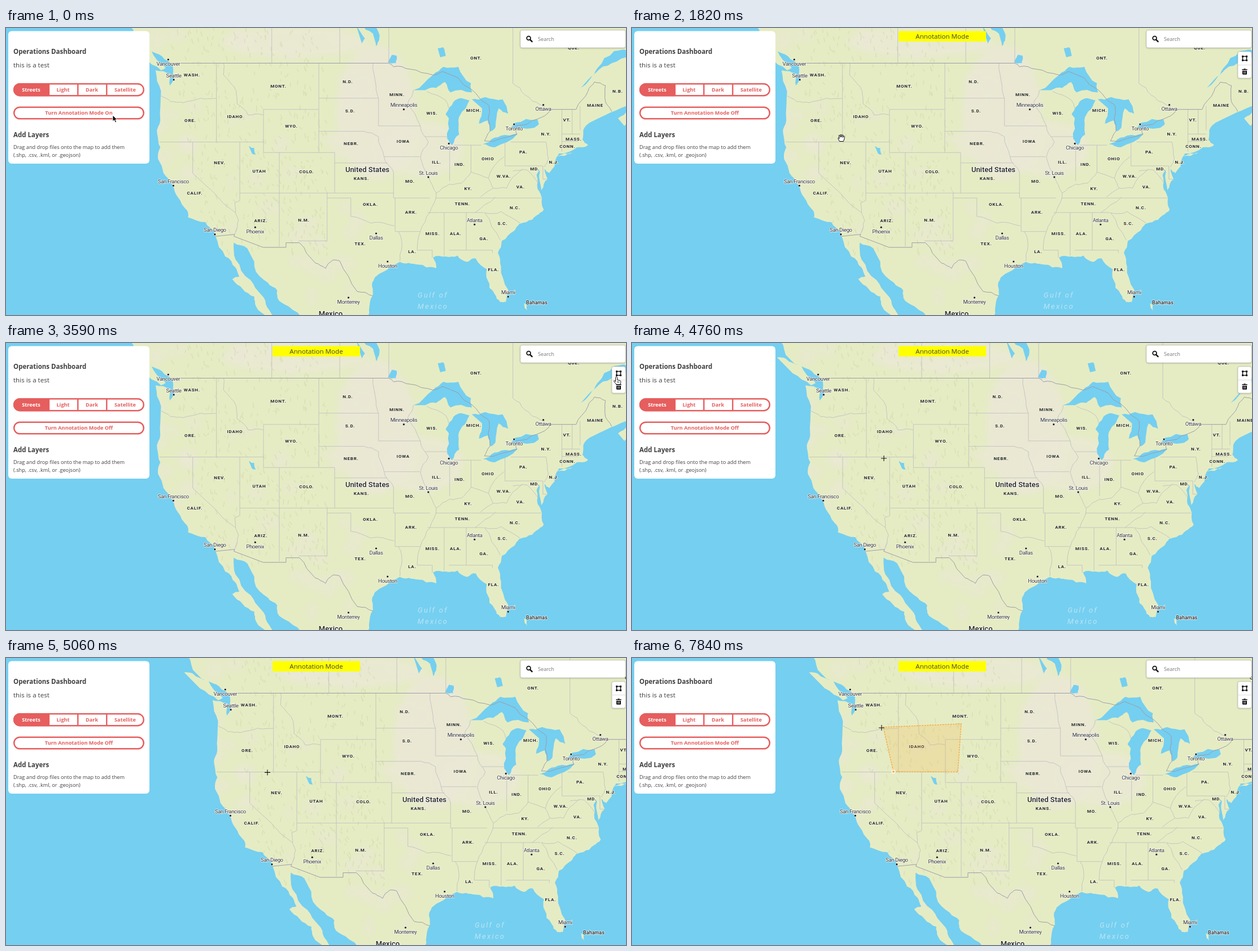
An HTML page that plays this animation: 1098 by 510 pixels, repeating every 7990 ms.

```html
<!DOCTYPE html>
<html lang="en">
<head>
<meta charset="utf-8">
<title>Map annotation</title>
<style>
html, body { margin: 0; width: 100%; height: 100%; overflow: hidden; background: #75cff0; }
svg { display: block; width: 100vw; height: 100vh; }
text { font-family: "Open Sans", sans-serif; fill: #404040; }
#map text { font-family: Roboto, sans-serif; text-anchor: middle; paint-order: stroke; stroke: #fffd; stroke-width: 1.6px; stroke-linejoin: round; fill: #222; }
#map .state { font-size: 8px; font-weight: 700; letter-spacing: .8px; stroke: #f0f2de; }
#map .city { font-size: 9.5px; letter-spacing: -.35px; fill: #333; }
#map .country { font-size: 13px; font-weight: 500; }
#map .islands { font-size: 9px; font-weight: 500; }
#map .sea { font-size: 13px; font-style: italic; letter-spacing: 2.3px; fill: #b9e5f6; stroke: none; }
.title { font-size: 11.5px; font-weight: 700; }
.lead { font-size: 11.6px; }
.note { font-size: 9.2px; }
.btn { font-size: 9.2px; font-weight: 700; text-anchor: middle; fill: #e65e5e; }
</style>
</head>
<body>
<svg viewBox="0 0 1098 510" preserveAspectRatio="none">
  <defs>
    <clipPath id="clip"><path id="clipLand"/></clipPath>
    <filter id="soft" x="-40%" y="-40%" width="180%" height="180%"><feGaussianBlur stdDeviation="6"/></filter>
    <filter id="shade" x="-10%" y="-20%" width="120%" height="150%"><feDropShadow dx="0" dy="0.5" stdDeviation="1" flood-opacity=".35"/></filter>
  </defs>
  <rect width="1098" height="510" fill="#75cff0"/>
  <g id="map">
    <path id="land" fill="#e5ecc3"/>
    <g clip-path="url(#clip)">
      <g id="dry" fill="#ebe8d8" filter="url(#soft)"></g>
      <path id="relief" fill="none" stroke="#cdd5a5" stroke-opacity=".45" stroke-width="1.7" stroke-linecap="round"/>
    </g>
    <path id="lakes" fill="#75cff0"/>
    <path id="isles" fill="#e5ecc3"/>
    <path id="states" fill="none" stroke="#bcbcc2" stroke-width=".8"/>
    <path id="nations" fill="none" stroke="#9c9ca8"/>
    <g id="labels"></g>
  </g>

  <g id="shape">
    <path id="area" fill="#fbb03b" fill-opacity=".2"/>
    <path id="edge" fill="none" stroke="#fba73b" stroke-width="1.4" stroke-dasharray="3 1.6"/>
    <circle cx="463" cy="202" r="3.4" fill="#fff"/>
    <circle cx="463" cy="202" r="2.1" fill="#fbb03b"/>
  </g>

  <rect x="4" y="5.5" width="250" height="235.5" rx="6" fill="#fff"/>
  <text class="title" x="13" y="46">Operations Dashboard</text>
  <text class="lead" x="13" y="70">this is a test</text>
  <path d="M76 98.2H24.5a11.5 11.5 0 0 0 0 23H76z" fill="#e65e5e"/>
  <g fill="none" stroke="#e65e5e" stroke-width="2.4">
    <rect x="14.2" y="99.2" width="229.6" height="21" rx="10.5"/>
    <path d="M76 99v21M127.3 99v21M178.3 99v21"/>
    <rect x="14.2" y="140.7" width="229.6" height="20.6" rx="10.3"/>
  </g>
  <text class="btn" x="44.5" y="112.6" style="fill:#fff">Streets</text>
  <text class="btn" x="101" y="112.6">Light</text>
  <text class="btn" x="152" y="112.6">Dark</text>
  <text class="btn" x="211" y="112.6">Satellite</text>
  <text class="btn" id="mode" x="129" y="154.2"></text>
  <text class="title" x="13" y="194">Add Layers</text>
  <text class="note" x="13" y="215">Drag and drop files onto the map to add them</text>
  <text class="note" x="13" y="229">(.shp, .csv, .kml, or .geojson)</text>

  <rect x="911" y="4" width="186" height="31" rx="3" fill="#fff" stroke="#bbb" stroke-width=".6" filter="url(#shade)"/>
  <circle cx="925.6" cy="18" r="3.4" fill="none" stroke="#111" stroke-width="1.8"/>
  <path d="M928 20.6l3.6 3.6" stroke="#111" stroke-width="2.4" stroke-linecap="round"/>
  <text class="note" x="942" y="23" style="fill:#777">Search</text>

  <g id="tools">
    <rect x="472" y="5.5" width="155" height="18.5" fill="#ff0"/>
    <text class="lead" x="549.5" y="19.2" text-anchor="middle">Annotation Mode</text>
    <rect x="1073" y="42" width="24" height="47" rx="3" fill="#fff" stroke="#bbb" stroke-width=".6" filter="url(#shade)"/>
    <path d="M1073 65.8h24" stroke="#ddd"/>
    <path d="M1081.5 50.5h7v7h-7z" fill="none" stroke="#111" stroke-width="1.5"/>
    <path d="M1080 49h3v3h-3zm7 0h3v3h-3zm-7 7h3v3h-3zm7 0h3v3h-3z" fill="#111"/>
    <path d="M1080.3 74h9.4M1083.5 73h3" stroke="#111" stroke-width="1.6"/>
    <path d="M1081 76h8v5.5q0 1.3-1.3 1.3h-5.4q-1.3 0-1.3-1.3z" fill="#111"/>
    <path d="M1083.8 77.2v4M1086.2 77.2v4" stroke="#fff" stroke-width=".9"/>
  </g>

  <g id="cursor" stroke-linejoin="round">
    <path id="arrow" d="M0 0V11l2.6-2.4 2 4.4 2-.9-2-4.2H8z" fill="#000" stroke="#fff" stroke-width=".9"/>
    <path id="point" d="M-1.5 1.5a1.5 1.5 0 0 1 3 0V5.6l5 1.2q1.6.5 1.3 2.5L7 13.6H0L-4.3 8.5q-.6-1.9 1-1.5l1.8 1.6zM2 8v2.5M4.3 8.3v2.3" fill="#fff" stroke="#111"/>
    <path id="grab" d="M-3.5 6.5L-6 1.5q-.3-2 1.2-1l1.2 1-1.2-5q.2-1.6 1.6-1L-2-1V-5q1-1.5 2 0v4l1-3.8q1.2-1 1.8.2L2.3-.5 3.7-3q1.3-.7 1.6.6L5 2 3.5 6.5z" fill="#fff" stroke="#111"/>
    <path id="cross" d="M-5 0H5M0-5V5" stroke="#111" stroke-width="1.1"/>
  </g>
</svg>
<script>
const $ = id => document.getElementById(id);
const set = (id, d) => $(id).setAttribute('d', d);
let seed = 7;
const rnd = () => (seed = seed * 16807 % 2147483647) / 2147483647;
const span = (a, b) => a + rnd() * (b - a);

// Mercator: degrees west and north to pixels, 14 px per degree.
const project = ([w, n]) => [2010.7 - 14 * w, 851.6 - 802.1 * Math.log(Math.tan((45 + n / 2) * Math.PI / 180))];
const numbers = s => s.trim().split(/\s+/).map(p => p.split(',').map(Number));
const geo = s => numbers(s).map(project);
const line = pts => 'M' + pts.map(p => p.map(v => +v.toFixed(1)).join(' ')).join('L');
const each = (list, fn) => list.split('|').map(s => fn(s.trim())).join('');

// Midpoint displacement turns a few key points into a ragged shore.
function ragged(pts, rough, levels = 2) {
  for (; levels--;) {
    pts = pts.flatMap((p, i) => {
      const q = pts[i + 1];
      if (!q) return [p];
      const dx = q[0] - p[0], dy = q[1] - p[1], k = Math.hypot(dx, dy) < 60 ? span(-rough, rough) : 0;
      return [p, [(p[0] + q[0]) / 2 - dy * k, (p[1] + q[1]) / 2 + dx * k]];
    });
  }
  return pts;
}
const shore = s => line(ragged(geo(s), .12)) + 'Z';
const river = s => line(ragged(geo(s), .1));
// Straight borders: a start, then the next longitude and latitude in turn.
function walk(s) {
  const [w, n, ...turns] = s.split(' ').map(Number), at = [w, n], pts = [[w, n]];
  turns.forEach((v, i) => { at[i % 2] = v; pts.push([...at]); });
  return line(pts.map(project));
}

const pacific = `128.4,52.3 127.2,50.9 124.6,49.8 123.2,49.2 122.5,48.7 122.3,47.6 122.9,47.1 122.8,48.1 124.7,48.4 124,46.6
  124.1,44 124.5,42.8 124.1,41.5 124.4,40.4 123.7,39 122.5,37.8 121.9,36.6 120.7,35.2 120.6,34.5 118.4,34 117.2,32.8`;
const baja = `117.1,32.5 115.9,30.3 114.6,29.1 114.1,28.1 115,27.8 113.7,26.7 112.2,25.8 112,24.7 110.3,23.5 109.9,22.9
  109.4,23.2 110.6,24.6 111.3,26 112.7,27.7 114.6,30 114.8,31.8 113.1,31.2 112.2,29.2 110.5,27.4 109.3,26.5 109.3,25.7 107.9,24.7 106,22.9`;
const gulf = `97.7,22.9 97.7,24.3 97.2,26 97.3,27.4 96.4,28.4 94.7,29.4 93.8,29.7 92.3,29.5 91.3,29.4 90.4,29.1 89.2,29
  89.6,30.2 88,30.3 86.5,30.4 85.3,29.7 84.2,30.1 82.8,28.9 82.7,27.7 81.8,26.1 81.1,25.2 80.4,25.2`;
const atlantic = `80.1,26.6 81,29.2 81.4,30.7 80.9,32 79.3,33.1 78.7,33.8 77.8,34 76.5,34.7 75.6,35.3 76,36.9 76.4,37.5 76.5,38.8
  76.1,39.3 76.1,38.2 75.9,37.3 75.1,38.4 75.5,39.4 74.9,39 74,40.5 73.7,40.9 71.4,41.5 70,41.7 70.7,42.2 70.6,43.1 69.8,43.8 67.2,44.7 64.5,45.6`;
const coast = line([...ragged(geo(pacific + ' ' + baja), .12), ...ragged(geo(gulf + ' ' + atlantic), .12), [1110, -5], [212, -5]]) + 'Z';
set('land', coast);
set('clipLand', coast);

set('lakes', each(`92.1,46.7 89.6,48 88.3,48.7 86.4,48.7 84.8,47.3 84.7,46.5 87.4,46.5 88.1,47.4 89.2,46.9 90.6,46.7
  |85,45.8 85.6,45 86.4,44 86.3,42.7 87.2,41.7 87.8,42.3 87.6,44.2 88,44.6 87,45.7 86,46
  |84.7,45.9 83,46.1 80.8,45.9 80.1,44.6 81.3,45.1 81.7,43.4 82.4,43 82.7,44 83.8,43.7 83.4,45.1
  |83.3,41.8 81.8,41.5 78.9,42.8 81,42.6 82.5,42|79.8,43.3 77,43.3 76.2,43.7 76.4,44.1 79.2,43.8
  |112.9,41.6 112.2,41.4 112,40.8 112.5,40.9|98.5,53 97,52 96.4,51 96.8,50.4 97.2,51.4 98.8,52.2|99.3,52 98.2,51 98.6,50.6
  |95.3,49.1 94.3,49 94.2,49.6 94.8,49.7|89,50.2 88.3,50.3 88,49.6 88.7,49.5
  |70.9,46.9 69,48.2 67,49 64.5,49.4 64.5,50 66.7,50 68.8,48.6 70,47.6`, shore));
set('isles', each(`128.3,50.7 127.2,50.6 125.3,50.1 123.4,48.6 124,48.4 126.3,49.4|66.2,44.2 65,45 63,45.3 63,44.6 65.4,43.5
  |74,40.6 72,41 73,40.9|78.1,25.1 77.8,24.9 77.7,24.2 78,24.5`, shore));

set('states', each('124.2 42 111.05 45 104.05 49|120 42 120 39|117 49 117 42|114.05 42 114.05 36.2|111.05 42 111.05 41 102.05 40 95.4'
  + '|104.05 45 104.05 41|104.05 46 96.5 43.5 91.2|104.05 43 98.3|109.05 41 109.05 31.4|114.05 37 94.6|102.05 40 102.05 37'
  + '|103 37 103 32 106.6|103 36.5 100 34.6|95.8 40.6 91.3|94.6 39.1 94.6 36.5 90|94.4 36.5 94.4 33 91.2|90.6 42.5 87.8|87.5 41.7 87.5 38.2'
  + '|87 41.7 83.5|84.8 41.7 84.8 39.1|80.5 42 80.5 39.7 75.7 38.4 75.1|79.8 42 75.3|90.3 35 83.2|89.3 36.5 75.9|88.2 35 88.2 30.4'
  + '|85.4 35 85.4 31|87.6 31 82.1 30.7|91.6 31 89.7 30.2|73.3 45 73.3 41.1|73.3 42.05 71.2|73.3 42.75 71|72 45 72 42.7|71 45.3 71 43.1'
  + '|110 53 110 49|101.4 53 101.4 49|95.2 49 95.2 53|79.5 53 79.5 47.3', walk)
+ each(`120,39 114.6,35|114.1,36.2 114.7,36 114.6,35 114.2,34.2 114.7,32.7|124,46.2 122.8,45.7 121.2,45.6 119,46 117,46
  |116.1,49 116.1,48 114.5,46.6 114.4,45.5 113,44.5 111.1,44.5|100,34.6 97.5,33.9 94.5,33.6|97.2,49 96.8,47 96.5,46
  |98.3,43 96.5,42.5 95.8,40.6 94.6,39.1|92.1,46.7 92.8,45.6 91.2,43.5 90.2,42 91.2,40.5 90.2,38.7 89.2,37 90,35 91.2,33 91.6,31
  |89.2,37 87.5,37.9 86,38 84.8,39.1 82.6,38.5 80.6,40.6|82.6,38.5 82,37.5 80.3,37.5 78.3,39.4|79.5,39.2 77.7,39.3 76.3,38
  |82,37.5 83.6,36.6|84.3,35 81.7,36.6|83.1,35 81,35.1 78.6,33.9|83.1,35 81.1,32.1|94,33 93.6,31 93.8,29.8|90.4,46.6 88,45.8 87.6,45.1
  |79.5,47.3 78,46.3 76,45.4 74.7,45|75.3,42 75,40.4 75.5,39.6`, river));
set('nations', each('123,49 95.2,49|74.7,45 71.5,45|117.1,32.5 114.7,32.7 114.8,32.5 111.1,31.3 108.2,31.3 108.2,31.8 106.5,31.8', s => line(geo(s)))
+ each(`95.2,49 94.6,48.7 92.5,48.5 89.6,48 88.4,48.3 84.8,46.8 83.6,45.9 82.5,45.3 82.4,43 83.1,42.1 79,42.7 79.1,43.5 76.5,44.1 74.7,45
  |71.5,45 70,46.6 69.2,47.4 67.8,47.1 67.8,45.7 67,44.8|106.5,31.8 104.5,29.6 103.2,29 102.3,29.9 101.4,29.8 99.2,26.4 97.2,25.9`, river));

// Scattered dry patches around a wide pale plain, and short strokes for hills.
const patch = (x, y, a, b, o) => `<ellipse cx="${x}" cy="${y}" rx="${a}" ry="${b}" opacity="${o}"/>`;
$('dry').innerHTML = patch(655, 150, 70, 120, .8) + patch(735, 215, 75, 50, .7) + patch(510, 25, 130, 28, .7)
  + Array.from({ length: 55 }, () => patch(span(265, 640), span(0, 510), span(6, 22), span(6, 18), .5)).join('');
set('relief', Array.from({ length: 420 }, () => {
  const y = span(0, 400), x = span(285 + y / 6, 570);
  return `M${x.toFixed(1)} ${y.toFixed(1)}l${span(-2, 4).toFixed(1)} ${span(2, 8).toFixed(1)}`;
}).join(''));

const label = (cls, name, x, y) => `<text class="${cls}" x="${x}" y="${y}">${name}</text>`;
const states = `WASH.,329,83|MONT.,482,103|N.D.,605,95|MINN.,692,118|ONT.,832,53|QUE.,1005,35|N.B.,1083,112|MAINE,1043,137|ORE.,326,164
|IDAHO,405,157|WYO.,505,174|S.D.,609,147|WIS.,754,151|MICH.,828,146|VT.,993,163|N.Y.,956,188|MASS.,1005,197|CONN.,994,210|NEBR.,611,205
|IOWA,703,201|ILL.,762,238|IND.,803,242|OHIO,853,232|PA.,916,220|N.J.,970,238|MD.,936,250|W.VA.,881,263|VA.,911,282|NEV.,378,239
|UTAH,448,254|COLO.,532,255|KANS.,629,267|MO.,715,272|KY.,818,285|TENN.,808,312|N.C.,901,319|S.C.,879,347|CALIF.,334,293|ARIZ.,451,342
|N.M.,527,341|OKLA.,645,313|ARK.,717,327|TEX.,627,383|LA.,719,397|MISS.,755,365|ALA.,796,365|GA.,846,374|FLA.,863,429`;
const named = dy => s => {
  const [name, w, n] = s.split(','), [x, y] = project([w, +n]);
  return `<circle cx="${x}" cy="${y}" r="1.9" fill="#111" stroke="#fff" stroke-width=".6"/>` + label('city', name, x, y + dy);
};
const labelBelow = 'Vancouver,123.1,49.3|Phoenix,112.1,33.45|Chicago,87.6,41.85|Dallas,96.8,32.8|Houston,95.35,29.75|Toronto,79.35,43.65|Ottawa,75.65,45.4|Monterrey,100.3,25.7';
const labelAbove = 'Seattle,122.4,47.6|San Francisco,122.45,37.75|San Diego,117.2,32.7|Minneapolis,93.3,45|St. Louis,90.2,38.6|Atlanta,84.35,33.75|Miami,80.1,25.8';
$('labels').innerHTML = each(states, s => { const [n, x, y] = s.split(','); return label('state', n, +x + .4, +y + 2.9); })
  + each(labelBelow, named(10.5)) + each(labelAbove, named(-4.3))
  + label('country', 'United States', 640, 256) + label('country', 'Mexico', 575, 512) + label('islands', 'Bahamas', 940, 491)
  + label('sea', 'Gulf of', 756, 479) + label('sea', 'Mexico', 756, 499);

// The picture refreshes in bursts (start, end, count) and holds in between.
const LOOP = 7990;
const bursts = numbers('140,140,1 470,770,3 1070,1820,6 2120,3150,8 3290,4320,8 4470,5060,5 5240,5420,2 5600,6040,4 6340,7240,7 7390,7840,4');
function held(t) {
  const burst = bursts.filter(b => b[0] <= t).pop();
  if (!burst) return 0;
  const [a, b, n] = burst, step = (b - a) / (n - 1) || 1;
  return a + step * Math.min(n - 1, Math.floor((t - a + 10) / step));
}
const part = (t, a, b) => Math.min(1, Math.max(0, (t - a) / (b - a)));
const mix = (a, b, f) => a + (b - a) * f;

const track = numbers(`0,189,155 770,190,156 1520,384,196 1820,371,195 2420,520,206 3150,1088,100 3584,1081,60 3731,1081,60
  4173,331,223 4320,394,208 4910,463,204 5420,463,202 5890,577,203 6040,575,191 6340,575,191 6790,583,117 7240,444,84 7840,442,124`);
function mouse(t) {
  const i = Math.max(1, track.findIndex(k => k[0] >= t)), [a, x, y] = track[i - 1], [b, u, v] = track[i], f = part(t, a, b);
  return [mix(x, u, f), mix(y, v, f)];
}
// Drag with momentum, then a slight settling back.
const pan = t => 101 * part(t, 4320, 5060) ** 1.71 - 2 * part(t, 5060, 5420);

const last = (list, t) => list.filter(k => k[0] <= t).pop()[1];
const pointers = [[0, 'arrow'], [140, 'point'], [1070, 'arrow'], [1370, 'grab'], [3290, 'point'], [3860, 'cross'], [6030, 'point'], [6480, 'cross']];
const corners = [[5600, 463, 202], [6035, 577, 202.5], [6790, 583, 117], [7680, 445, 123]];

let shown = -1;
function draw(t) {
  if (t === shown) return;
  shown = t;
  const [x, y] = mouse(t), kind = last(pointers, t), on = t >= 470;
  $('map').setAttribute('transform', `translate(${pan(t)} 0)`);
  $('cursor').setAttribute('transform', `translate(${x} ${y})`);
  for (const el of $('cursor').children) el.style.display = el.id === kind ? '' : 'none';
  $('tools').style.display = on ? '' : 'none';
  $('mode').textContent = 'Turn Annotation Mode ' + (on ? 'Off' : 'On');

  const ring = corners.filter(c => c[0] <= t).map(c => c.slice(1));
  $('shape').style.display = ring.length ? '' : 'none';
  if (!ring.length) return;
  if (kind === 'cross' && ring.length < corners.length) ring.push([x, y]);
  const outline = line(ring) + (ring.length > 2 ? 'Z' : '');
  set('edge', outline);
  set('area', outline);
}
function tick() {
  draw(held(performance.now() % LOOP));
  requestAnimationFrame(tick);
}
tick();
</script>
</body>
</html>
```
